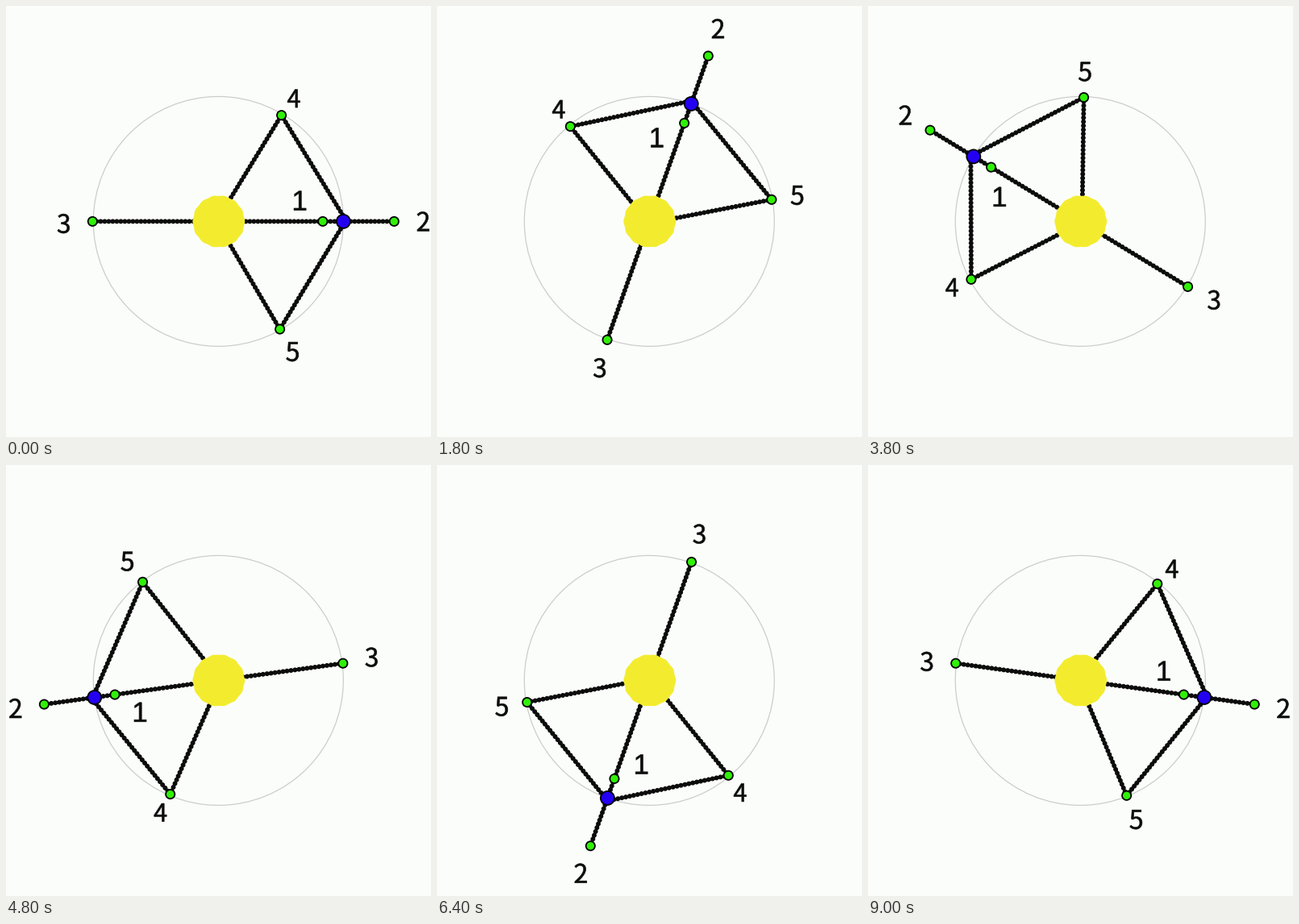
A matplotlib script for the animation above (9.2 s loop, 527 px wide and 535 px high).

```python
import numpy as np
import matplotlib.pyplot as plt
from matplotlib.animation import FuncAnimation
from matplotlib.patches import Circle, PathPatch, Polygon
from matplotlib.path import Path
from matplotlib.textpath import TextPath

W, H, DPI = 527, 535, 64
PT = 72 / DPI                      # points per pixel
FRAMES, INTERVAL = 46, 200
CENTER = np.array([263.3, 267.4])
ORBIT = 155
DOT, STEP = 6.0, 5.0               # size and spacing of the link dots

INK = "#0c0c0c"
GREEN = "#30f008"
BLUE = "#2400f2"

# Polar places (radius, degrees) relative to the planet's direction
POINTS = [(129.5, 0), (218, 0), (156, 180), (153.3, 59.3), (154, -60.3)]
LABELS = {"1": (104.5, 14.3), "2": (254, 0), "3": (192, 180.8),
          "4": (179, 58.5), "5": (186, -60.4)}
HUB = (2.5, 180)
LINKS = [
    (POINTS[2], POINTS[1]),
    (HUB, POINTS[3]),
    (HUB, POINTS[4]),
    (POINTS[3], (155, 2.5)),
    (POINTS[4], (153, -2.8)),
]


def place(polar, turn=0.0):
    """Screen position of a polar place after a counter-clockwise turn."""
    r, deg = polar
    a = np.radians(deg + turn)
    return CENTER + r * np.array([np.cos(a), -np.sin(a)])


def glyph(char):
    """Digit outline centred on the origin, y pointing down."""
    family = "Liberation Sans" if char == "1" else "Noto Sans CJK JP"
    path = TextPath((0, 0), char, size=100, prop={"family": family})
    box = path.get_extents()
    verts = path.vertices - [(box.x0 + box.x1) / 2, (box.y0 + box.y1) / 2]
    scale = (22.5 if char == "4" else 24) / box.height
    return Path(verts * [scale, -scale], path.codes)


def ball(radius, color, z):
    return ax.add_patch(Circle(CENTER, radius, fc=color, ec="black",
                               lw=1.8 * PT, zorder=z))


fig = plt.figure(figsize=(W / DPI, H / DPI), dpi=DPI, facecolor="#fbfdfa")
ax = fig.add_axes([0, 0, 1, 1])
ax.set_xlim(0, W)
ax.set_ylim(H, 0)
ax.axis("off")

ax.add_patch(Circle(CENTER, ORBIT, fill=False, ec="#cbcbcb", lw=1.2 * PT, zorder=1))

# Tiny dashes with round caps make evenly spaced dots
dots = (0, (0.02, STEP / DOT - 0.02))
links = [ax.plot([], [], ls=dots, lw=DOT * PT, color=INK, snap=False,
                 dash_capstyle="round", zorder=2)[0] for _ in LINKS]

# Sun with a slightly uneven rim
rim = np.linspace(0, 2 * np.pi, 180, endpoint=False)
radius = 32 + 0.4 * np.cos(14 * rim)
sun = CENTER + [0.5, 0] + radius[:, None] * np.column_stack([np.cos(rim), np.sin(rim)])
ax.add_patch(Polygon(sun, fc="#f3ec2e", ec="none", zorder=3))

points = [ball(5.6, GREEN, 5) for _ in POINTS]
planet = ball(8.5, BLUE, 6)

glyphs = {c: glyph(c) for c in LABELS}
labels = {c: ax.add_patch(PathPatch(g, fc=INK, ec=INK, lw=0.6 * PT, zorder=7))
          for c, g in glyphs.items()}


def update(i):
    turn = 360 * i / FRAMES
    for line, (start, end) in zip(links, LINKS):
        line.set_data(*np.array([place(start, turn), place(end, turn)]).T)
    for disc, polar in zip(points, POINTS):
        disc.center = place(polar, turn)
    planet.center = place((ORBIT, 0), turn)
    for char, patch in labels.items():
        g = glyphs[char]
        patch.set_path(Path(g.vertices + place(LABELS[char], turn), g.codes))
    return [*links, *points, planet, *labels.values()]


anim = FuncAnimation(fig, update, frames=FRAMES, interval=INTERVAL,
                     repeat=True, repeat_delay=0, blit=False)
plt.show()
```
